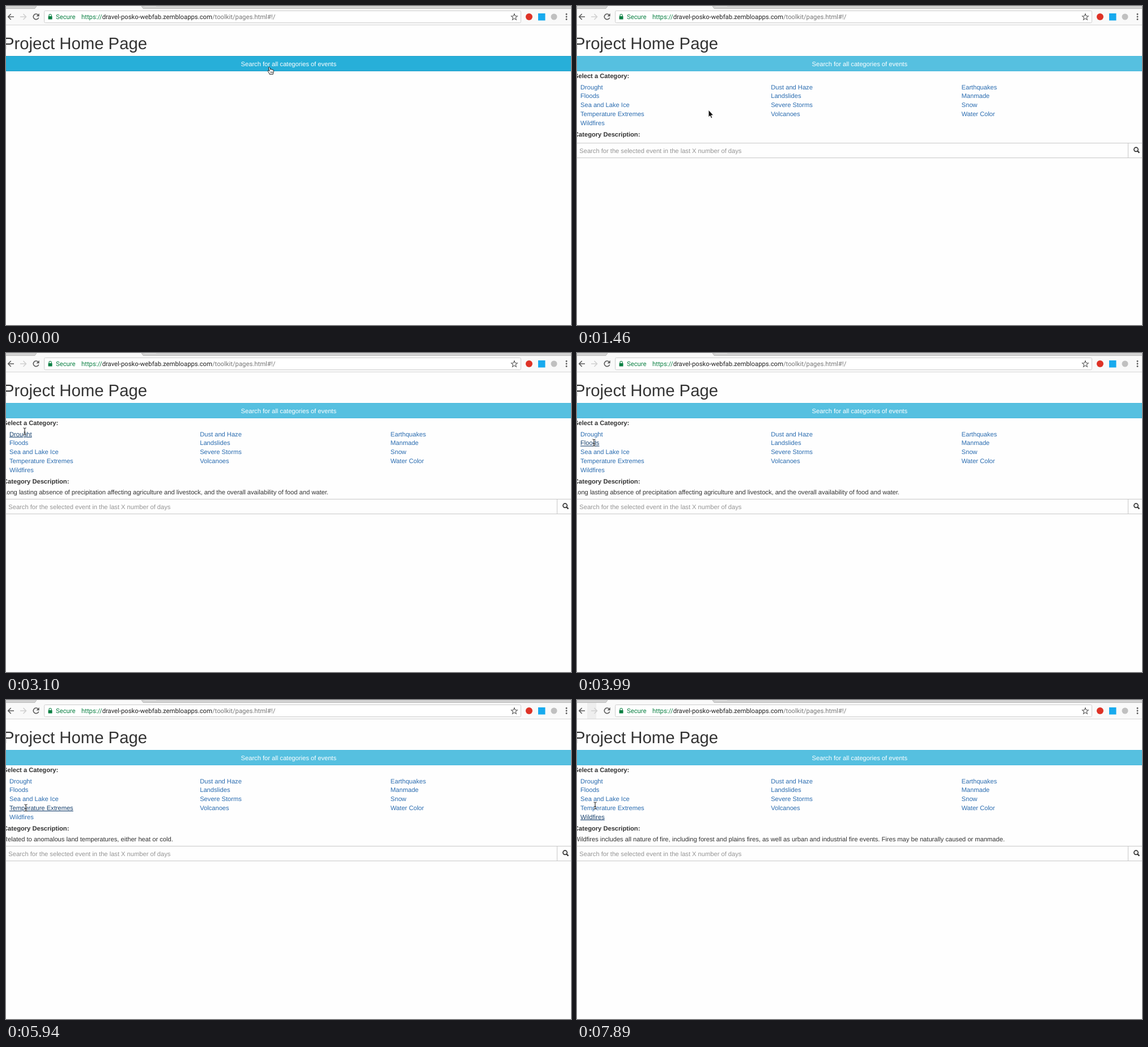
An HTML page for the animation above (8 s loop, 997x562 px).

```html
<!DOCTYPE html>
<html lang="en">
<head>
<meta charset="utf-8">
<title>Project Home Page</title>
<style>
html, body { margin: 0; width: 100%; height: 100%; overflow: hidden; background: #fefefe; }
svg { display: block; width: 997px; height: 562px; }
text { font: 11.15px "Liberation Sans", Arial, sans-serif; fill: #333; text-rendering: geometricPrecision; white-space: pre; }
.title { font-size: 29.3px; }
.bold { font-weight: bold; }
.hint { fill: #949494; }
.bar text { font: 11.3px Roboto, sans-serif; fill: #777; }
.bar .safe { fill: #0b8043; }
.bar .host { fill: #222; }
.links text { fill: #2a6cb0; }
.label { fill: #fff; text-anchor: middle; }
.line { fill: none; stroke: #5a5a5a; stroke-width: 1.6; }

.anim, .desc text { animation: 8s step-end infinite; }
.desc text { opacity: 0; }
#button { animation-name: button; }
#panel { animation-name: panel; }
#search { animation-name: search; }
#strip { animation-name: strip; }
#drought { animation-name: drought; }
#floods { animation-name: floods; }
#ice { animation-name: ice; }
#temp { animation-name: temp; }
#fires { animation-name: fires; }
#cursor { animation-name: move; }
#hand { animation-name: hand; }
#arrow { animation-name: arrow; }
#beam { animation-name: beam; }
.desc text:nth-child(1) { animation-name: d1; }
.desc text:nth-child(2) { animation-name: d2; }
.desc text:nth-child(3) { animation-name: d3; }
.desc text:nth-child(4) { animation-name: d4; }
.desc text:nth-child(5) { animation-name: d5; }

@keyframes button { 0% { fill: #27afd9; stroke: #219fc9; } 14.25%, 100% { fill: #56c0e0; stroke: #4cb9dc; } }
@keyframes panel { 0% { opacity: 0; } 6.75%, 100% { opacity: 1; } }
@keyframes search { 0% { transform: translateY(0); } 38.75%, 100% { transform: translateY(16px); } }
@keyframes strip { 0%, 64.875% { opacity: 0; } 53.625%, 96.75%, 100% { opacity: 1; } }

@keyframes drought {
  0%, 48%, 100% { fill: #2a6cb0; text-decoration: none; }
  31.25% { fill: #1b4470; text-decoration: underline; }
}
@keyframes floods {
  0%, 31.25%, 55.5%, 68.625%, 100% { fill: #2a6cb0; text-decoration: none; }
  23.875%, 48%, 66.75% { fill: #1b4470; text-decoration: underline; }
}
@keyframes ice {
  0%, 66.75%, 74.25%, 100% { fill: #2a6cb0; text-decoration: none; }
  55.5%, 68.625% { fill: #1b4470; text-decoration: underline; }
}
@keyframes temp {
  0%, 78%, 100% { fill: #2a6cb0; text-decoration: none; }
  74.25% { fill: #1b4470; text-decoration: underline; }
}
@keyframes fires {
  0%, 89.25% { fill: #2a6cb0; text-decoration: none; }
  78%, 93%, 100% { fill: #1b4470; text-decoration: underline; }
}

@keyframes d1 { 0%, 53.625%, 100% { opacity: 0; } 38.75% { opacity: 1; } }
@keyframes d2 { 0%, 64.875%, 100% { opacity: 0; } 53.625% { opacity: 1; } }
@keyframes d3 { 0%, 74.25%, 100% { opacity: 0; } 64.875% { opacity: 1; } }
@keyframes d4 { 0%, 96.75%, 100% { opacity: 0; } 74.25% { opacity: 1; } }
@keyframes d5 { 0% { opacity: 0; } 96.75%, 100% { opacity: 1; } }

@keyframes hand { 0% { opacity: 1; } 14.25%, 100% { opacity: 0; } }
@keyframes arrow { 0%, 23.875%, 100% { opacity: 0; } 14.25% { opacity: 1; } }
@keyframes beam { 0% { opacity: 0; } 23.875%, 100% { opacity: 1; } }
@keyframes move {
  0% { transform: translate(467px, 113px); }
  12.375% { transform: translate(462px, 113px); }
  14.25% { transform: translate(436px, 126px); }
  16.125% { transform: translate(352px, 158px); }
  18% { transform: translate(236px, 190px); }
  19.875% { transform: translate(128px, 207px); }
  22% { transform: translate(58px, 196px); }
  23.875% { transform: translate(33px, 162px); }
  27.625% { transform: translate(32px, 157px); }
  29.5% { transform: translate(32px, 151px); }
  31.25% { transform: translate(32px, 144px); }
  33.125% { transform: translate(33px, 138px); }
  44.375% { transform: translate(33px, 142px); }
  46.25% { transform: translate(32px, 148px); }
  48% { transform: translate(31px, 153px); }
  49.875% { transform: translate(30px, 158px); }
  53.625% { transform: translate(31px, 163px); }
  55.5% { transform: translate(33px, 170px); }
  57.375% { transform: translate(34px, 175px); }
  59.25% { transform: translate(35px, 179px); }
  64.875% { transform: translate(35px, 173px); }
  66.75% { transform: translate(35px, 163px); }
  68.625% { transform: translate(35px, 170px); }
  70.5% { transform: translate(35px, 179px); }
  74.25% { transform: translate(35px, 190px); }
  76.125% { transform: translate(35px, 193px); }
  78% { transform: translate(35px, 199px); }
  79.875% { transform: translate(34px, 203px); }
  87.375% { transform: translate(34px, 210px); }
  89.25% { transform: translate(33px, 219px); }
  91.125% { transform: translate(33px, 214px); }
  93% { transform: translate(33px, 207px); }
  96.75% { transform: translate(32px, 199px); }
  98.625%, 100% { transform: translate(32px, 186px); }
}
</style>
</head>
<body>
<svg viewBox="0 0 997 562">
  <rect width="997" height="562" fill="#fefefe"/>

  <g class="bar">
    <rect width="997" height="33" fill="#f9f9f9"/>
    <path d="M0 0H54L51 4.5H0ZM239 0H997V4.5H242Z" fill="#d3d3d3"/>
    <path d="M0 4.5H51L54 0M239 0L242 4.5H997" fill="none" stroke="#b9b9b9"/>
    <path d="M243 0H265V1H245Z" fill="#e6e6e6"/>
    <path d="M0 33.5H997" stroke="#d6d6d6"/>
    <rect id="strip" class="anim" x="18" y="5" width="16" height="28" fill="#eee"/>
    <path class="line" d="M14 19H4M8.7 14L3.8 19L8.7 24"/>
    <path class="line" style="stroke:#d0d0d0" d="M25 19H35M30.5 14L35.4 19L30.5 24"/>
    <path class="line" d="M56.6 15.6A4.8 4.8 0 1 0 57.6 20.4"/>
    <path d="M58.6 13V18.2H53.4Z" fill="#5a5a5a"/>
    <rect x="67.500" y="8.500" width="841" height="21" rx="2" fill="#fff" stroke="#cdcdcd"/>
    <rect x="74.500" y="18" width="7" height="5.500" rx=".6" fill="#0b8043"/>
    <path d="M76 18V16.500a2 2 0 0 1 4 0V18" fill="none" stroke="#0b8043" stroke-width="1.200"/>
    <text class="safe" x="88" y="23">Secure</text>
    <text x="133" y="23"><tspan class="safe">https://</tspan><tspan class="host">dravel-posko-webfab.zembloapps.com</tspan>/toolkit/pages.html#!/</text>
    <path d="M897 13.800L898.500 17.500L902.400 17.800L899.400 20.300L900.400 24.200L897 22.100L893.600 24.200L894.600 20.300L891.600 17.800L895.500 17.500Z" fill="none" stroke="#5a5a5a" stroke-width="1.100"/>
    <circle cx="923" cy="19" r="6" fill="#de3226"/>
    <rect x="939" y="13" width="12.500" height="12.500" fill="#17aaee"/>
    <circle cx="967" cy="19" r="5.500" fill="#c0c0c0"/>
    <g fill="#5a5a5a">
      <circle cx="989" cy="14.500" r="1.400"/>
      <circle cx="989" cy="19" r="1.400"/>
      <circle cx="989" cy="23.500" r="1.400"/>
    </g>
  </g>

  <text class="title" x="-5" y="76">Project Home Page</text>
  <rect id="button" class="anim" x="-5" y="88.500" width="1007" height="26"/>
  <text class="label" x="498.800" y="105.700">Search for all categories of events</text>

  <g id="panel" class="anim">
    <text class="bold" x="-5" y="127">Select a Category:</text>
    <g class="links">
      <text id="drought" class="anim" x="6" y="146.700">Drought</text>
      <text id="floods" class="anim" x="6" y="162.400">Floods</text>
      <text id="ice" class="anim" x="6" y="178.200">Sea and Lake Ice</text>
      <text id="temp" class="anim" x="6" y="194">Temperature Extremes</text>
      <text id="fires" class="anim" x="6" y="209.700">Wildfires</text>
      <text x="342.200" y="146.700">Dust and Haze</text>
      <text x="342.200" y="162.400">Landslides</text>
      <text x="342.200" y="178.200">Severe Storms</text>
      <text x="342.200" y="194">Volcanoes</text>
      <text x="678.500" y="146.700">Earthquakes</text>
      <text x="678.500" y="162.400">Manmade</text>
      <text x="678.500" y="178.200">Snow</text>
      <text x="678.500" y="194">Water Color</text>
    </g>
    <text class="bold" x="-5" y="229.500">Category Description:</text>
    <g class="desc">
      <text x="-5" y="249">Long lasting absence of precipitation affecting agriculture and livestock, and the overall availability of food and water.</text>
      <text x="-5" y="249">Related to aspects of actual flooding--e.g., inundation, water extending beyond river and lake extents.</text>
      <text x="-5" y="249">Related to all ice that resides on oceans and lakes, including sea and lake ice (permanent and seasonal) and icebergs.</text>
      <text x="-5" y="249">Related to anomalous land temperatures, either heat or cold.</text>
      <text x="-5" y="249">Wildfires includes all nature of fire, including forest and plains fires, as well as urban and industrial fire events. Fires may be naturally caused or manmade.</text>
    </g>
    <g id="search" class="anim">
      <path d="M0 241.500H997M0 267.500H997M972.500 241V268" stroke="#c8c8c8"/>
      <text class="hint" x="4.300" y="258.500">Search for the selected event in the last X number of days</text>
      <circle cx="986.500" cy="252.800" r="3.600" fill="none" stroke="#333" stroke-width="1.700"/>
      <path d="M989.200 255.500L992.300 258.600" stroke="#333" stroke-width="2.200"/>
    </g>
  </g>

  <g id="cursor" class="anim">
    <g id="hand" class="anim" fill="#fff" stroke="#111" stroke-linejoin="round">
      <path d="M-2 7.200C-2.400 4.800-4.800 3-5 1.200C-4.800 0-3.200 .2-2.200 1.800L-3.600-4C-3.800-5.800-1.800-6-1.300-4.300L-.3-1C.2-2.200 1.400-2 1.800-.8C2.400-1.600 3.500-1.200 3.700-.2C4.600-.6 5.300 0 5.300 1C5.300 3.500 4.500 4.500 4.200 7.200Z"/>
      <path d="M-.1 2.500V5M1.600 2.500V5M3.200 2.500V5" stroke-width=".7"/>
    </g>
    <path id="arrow" class="anim" d="M-4-7V6L-1.200 3.400L.8 8L2.900 7.100L1 2.700H5Z" fill="#111" stroke="#fff"/>
    <g id="beam" class="anim" fill="none">
      <path d="M-2.500-6Q0-6 0-4.500Q0-6 2.500-6M0-4.500V4.500M-2.500 6Q0 6 0 4.500Q0 6 2.500 6M-1.500 1.500H1.500" stroke="#fff" stroke-opacity=".7" stroke-width="2.200"/>
      <path d="M-2.500-6Q0-6 0-4.500Q0-6 2.500-6M0-4.500V4.500M-2.500 6Q0 6 0 4.500Q0 6 2.500 6M-1.500 1.500H1.500" stroke="#111"/>
    </g>
  </g>
</svg>
</body>
</html>
```
